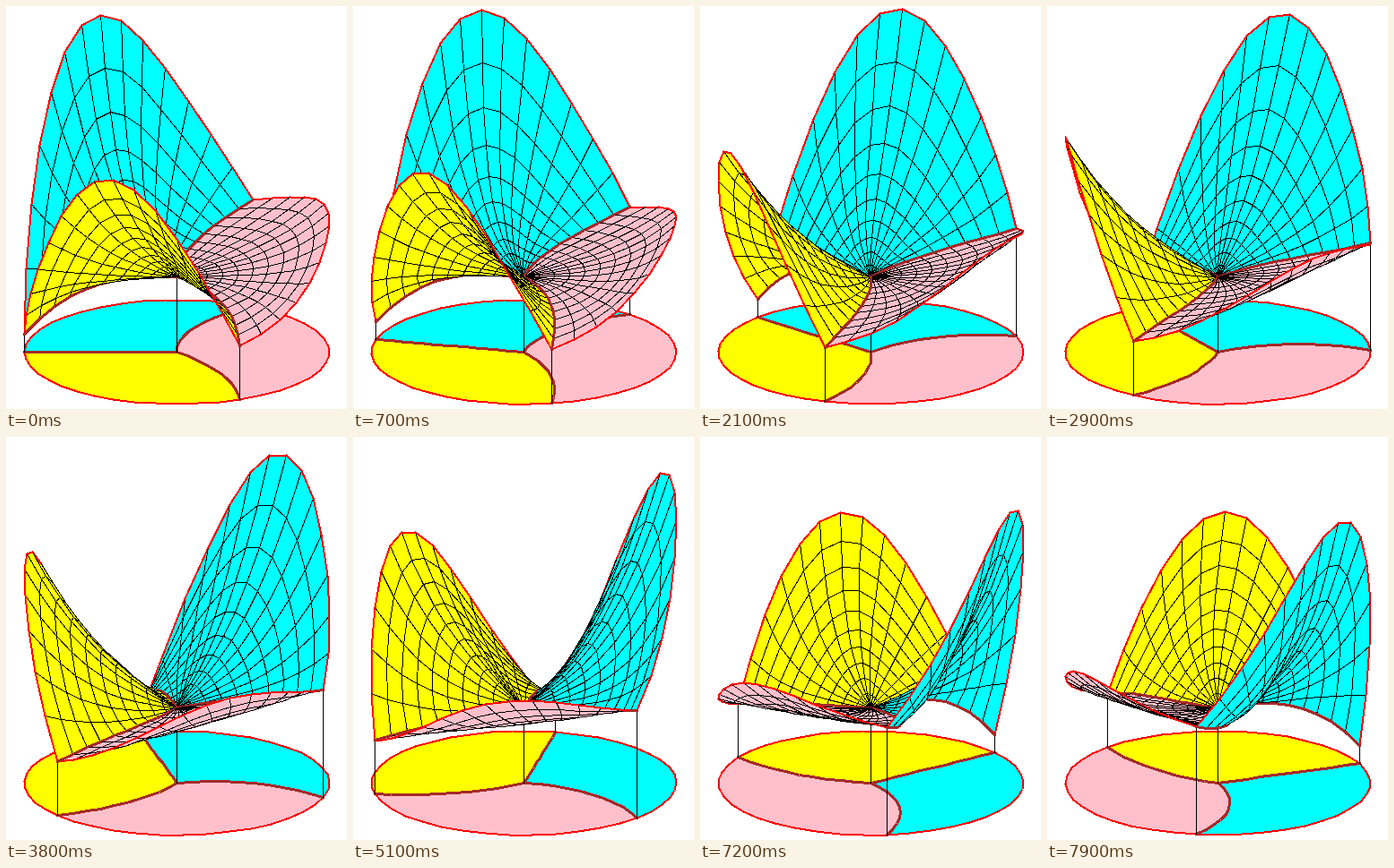
Animation, 380 px wide and 450 px high, one loop 8000 ms. Source, as an HTML page:

```html
<!DOCTYPE html>
<html lang="en">
<head>
<meta charset="utf-8">
<title>Rotating three-part surface</title>
<style>
  html, body { margin: 0; width: 100%; height: 100%; overflow: hidden; background: #fff; }
  svg { display: block; }
</style>
</head>
<body>
<svg id="stage" width="380" height="450" viewBox="-.5 -.5 380 450"
     shape-rendering="crispEdges" stroke-linejoin="round" stroke-linecap="round"></svg>
<script>
const STEP = 100, LOOP = 8000, RINGS = 10, SLICES = 14;
const CX = 190, CY = 386, RX = 170, RY = 58, PEAK = 84;
const { sin, cos, PI } = Math;

// Borders: rim angle, twist toward the centre, rim height, linear share of the profile
const a = { angle: 180, twist: 0, rise: -64, share: 0 };
const b = { angle: 65.6, twist: 21, rise: -24, share: .1 };
const c = { angle: 300, twist: 32, rise: 36, share: .5 };

// Sheets: two borders, sine weights of the rim bump, linear share at mid-sheet
const sheets = [
  { from: a, to: c, color: '#0ff', wave: [246, 21, -10], share: .25 },
  { from: c, to: b, turn: 360, color: '#ffc0cb', wave: [49, 8, -4.6], share: 0 },
  { from: b, to: a, color: '#ff0', wave: [190, 23, -9], share: .53 }
];

const profile = (rise, share, r) => rise * (share * r + (1 - share) * r ** 3);
const borderAngle = (edge, r) => edge.angle - edge.twist * (1 - r);

function height({ from, to, wave, share }, r, t) {
  const bump = wave.reduce((sum, w, i) => sum + w * sin((i + 1) * PI * t), 0);
  return PEAK + (1 - t) * profile(from.rise, from.share, r)
    + t * profile(to.rise, to.share, r)
    + profile(bump, share * sin(PI * t), r);
}

function point(sheet, i, j, spin) {
  const r = i / RINGS, t = j / SLICES;
  const start = borderAngle(sheet.from, r);
  const end = borderAngle(sheet.to, r) + (sheet.turn || 0);
  const angle = (start + (end - start) * t + spin) * PI / 180;
  const x = CX + RX * r * cos(angle), y = CY + RY * r * sin(angle);
  return { x, y, top: y - height(sheet, r, t) };
}

const ground = p => [p.x, p.y];
const raised = p => [p.x, p.top];
const path = pts => 'M' + pts.map(p => p.map(Math.round)).join('L');
const fill = (pts, color, stroke = 'none') =>
  `<path d="${path(pts)}Z" fill="${color}" stroke="${stroke}"/>`;
const line = (pts, color, width) =>
  `<path d="${path(pts)}" fill="none" stroke="${color}" stroke-width="${width}"/>`;
const rim = pts => line(pts, 'red', 2);
const border = pts => line(pts, 'brown', 3);
const range = n => Array.from({ length: n + 1 }, (_, i) => i);

function draw(spin) {
  const cells = [];
  let floor = '', rims = '', borders = '', posts = '';

  for (const sheet of sheets) {
    const grid = range(RINGS).map(i => range(SLICES).map(j => point(sheet, i, j, spin)));
    const first = grid.map(row => row[0]), last = grid.map(row => row[SLICES]);
    const arc = grid[RINGS];

    floor += fill([...first, ...arc, ...last.reverse()].map(ground), sheet.color);
    rims += rim(arc.map(ground));
    borders += border(first.map(ground));
    posts += line([ground(arc[0]), raised(arc[0])], '#000', 1);

    for (let i = 0; i < RINGS; i++) {
      for (let j = 0; j < SLICES; j++) {
        const quad = [grid[i][j], grid[i + 1][j], grid[i + 1][j + 1], grid[i][j + 1]];
        const [p, q, s, u] = quad.map(raised);
        let svg = fill([p, q, s, u], sheet.color, '#000');
        if (i === RINGS - 1) svg += rim([q, s]);
        if (j === 0) svg += border([p, q]);
        if (j === SLICES - 1) svg += border([u, s]);
        cells.push({ svg, depth: quad.reduce((sum, v) => sum + v.y, 0) });
      }
    }
  }

  posts += line([[CX, CY], [CX, CY - PEAK]], '#000', 1);
  cells.sort((m, n) => m.depth - n.depth);
  stage.innerHTML = floor + rims + borders + posts + cells.map(cell => cell.svg).join('');
}

const stage = document.getElementById('stage');
const begin = performance.now();
let shown = -1;

function tick() {
  const step = Math.floor((performance.now() - begin) % LOOP / STEP);
  if (step !== shown) draw(2 * (shown = step));
  requestAnimationFrame(tick);
}
tick();
</script>
</body>
</html>
```
